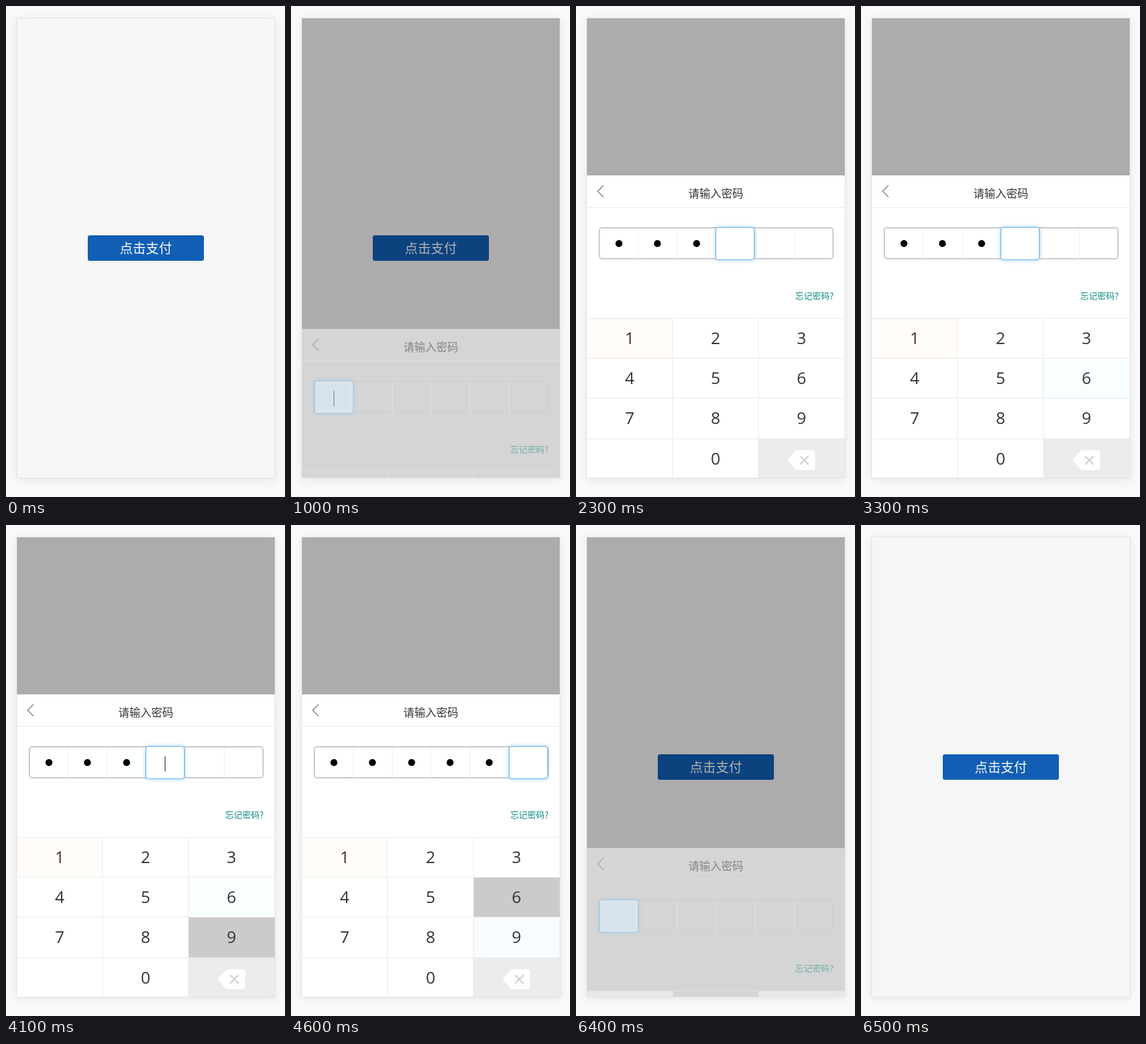
Animation, 406 px wide and 713 px high, one loop 7300 ms. Source, as an HTML page with a canvas:

```html
<!DOCTYPE html>
<html lang="zh-CN">
<head>
<meta charset="utf-8">
<title>支付密码</title>
<style>
html, body { margin: 0; width: 100%; height: 100%; overflow: hidden; background: #f9f9f9; }
canvas { display: block; }
</style>
</head>
<body>
<canvas id="stage" width="406" height="713"></canvas>
<script>
const ctx = document.getElementById('stage').getContext('2d');
const LOOP = 7300;
const OPEN = 1000, CLOSE = 6400, STEP = 100;
const SLIDE = 223, HALF_ALPHA = 0.5;
const SANS = '"Open Sans", "Noto Sans CJK SC", "Noto Sans CJK", sans-serif';
const CJK = '"Noto Sans CJK SC", "Noto Sans CJK", "Noto Sans CJK JP", sans-serif';
const COLS = [16, 141, 266, 391];
const ROWS = [454, 512, 570, 629, 685];
const PRESSED = '#cbcbcc';

// [time, number of dots entered]
const ENTRIES = [[0, 0], [1700, 1], [2000, 2], [2200, 3], [2500, 4], [3300, 3],
  [3600, 2], [4100, 3], [4300, 4], [4600, 5], [4900, 0]];

// Each press lasts one step and leaves a faint tint on the key.
const PRESSES = [
  { at: 1700, key: 1, tint: '#fffcf9' },
  { at: 2500, key: 6, tint: '#f9ffff' },
  { at: 4100, key: 9, tint: '#f8fcff' },
  { at: 4600, key: 6, tint: '#f9ffff' },
  { at: 4900, key: 3, tint: '#f8fcff' }
];

const lastBefore = (list, t) => list.filter(e => e[0] <= t).pop()[1];

function caretVisible(t) {
  const blink = 4700 / 12;
  const n = Math.floor((t - 1400) / blink + 0.12);
  return Math.abs(n % 2) === 1;
}

function rect(x, y, w, h, color) {
  ctx.fillStyle = color;
  ctx.fillRect(x, y, w, h);
}

function roundRect(x, y, w, h, r) {
  ctx.beginPath();
  ctx.roundRect(x, y, w, h, r);
}

function polyline(points, color, width) {
  ctx.beginPath();
  points.forEach(([x, y]) => ctx.lineTo(x, y));
  ctx.strokeStyle = color;
  ctx.lineWidth = width;
  ctx.stroke();
}

function text(str, x, y, size, color, family = CJK, align = 'center') {
  ctx.font = `${size}px ${family}`;
  ctx.textAlign = align;
  ctx.fillStyle = color;
  ctx.fillText(str, x, y);
}

function shadow(color, blur, y = 0) {
  ctx.shadowColor = color;
  ctx.shadowBlur = blur;
  ctx.shadowOffsetY = y;
}

function drawPage() {
  rect(0, 0, 406, 713, '#f9f9f9');
  ctx.save();
  shadow('rgba(0,0,0,0.08)', 12, 2);
  rect(15, 17, 377, 669, '#e3e3e3');
  ctx.restore();
  rect(16, 18, 375, 667, '#f6f6f6');
  roundRect(119, 333, 169, 37, 3);
  ctx.fillStyle = '#115eb4';
  ctx.fill();
  text('点击支付', 203.5, 359, 19, '#fff');
}

function drawInput(t) {
  const count = lastBefore(ENTRIES, t);
  roundRect(34, 322, 340, 45, 4);
  ctx.strokeStyle = '#cccccc';
  ctx.lineWidth = 2;
  ctx.stroke();
  for (let i = 1; i < 6; i++) rect(Math.round(33.6 + 56.6 * i), 323, 1, 46, '#efefef');

  const x = Math.round(34.5 + 56.6 * count) - 0.5;
  ctx.save();
  shadow('rgba(82,168,236,0.6)', 6);
  roundRect(x, 321.5, 56, 47, 4);
  ctx.fillStyle = '#fff';
  ctx.fill();
  ctx.restore();
  ctx.strokeStyle = '#70b6ec';
  ctx.lineWidth = 1.2;
  ctx.stroke();

  const center = i => Math.floor(62.1 + 56.5 * i);
  for (let i = 0; i < count; i++) {
    roundRect(center(i) - 4.5, 340, 10, 10, 4.7);
    ctx.fillStyle = '#000';
    ctx.fill();
  }
  if (caretVisible(t)) rect(center(count), 336, 1, 22, '#222');
}

function drawBackspace() {
  rect(265, 628, 126, 57, '#ececec');
  ctx.beginPath();
  ctx.moveTo(308, 659.5);
  ctx.lineTo(319, 646.5);
  ctx.quadraticCurveTo(320.5, 645, 323, 645);
  ctx.arcTo(348, 645, 348, 649, 4);
  ctx.arcTo(348, 674, 344, 674, 4);
  ctx.lineTo(323, 674);
  ctx.quadraticCurveTo(320.5, 674, 319, 672.5);
  ctx.closePath();
  ctx.fillStyle = '#fff';
  ctx.fill();
  polyline([[326, 653.5], [338.5, 666]], '#d0d0d0', 2);
  polyline([[338.5, 653.5], [326, 666]], '#d0d0d0', 2);
}

function drawKeys(t) {
  for (const { at, key, tint } of PRESSES) {
    if (t < at) continue;
    const c = (key - 1) % 3, r = Math.floor((key - 1) / 3);
    rect(COLS[c], ROWS[r], COLS[c + 1] - COLS[c], ROWS[r + 1] - ROWS[r],
      t < at + STEP ? PRESSED : tint);
  }
  for (const y of ROWS.slice(0, 4)) rect(16, y - 1, 375, 1, '#ebebeb');
  for (const x of COLS.slice(1, 3)) rect(x - 1, 453, 1, 232, '#ebebeb');
  drawBackspace();
  const baselines = [491, 549, 607, 666];
  const centers = [78, 203, 328];
  for (let n = 1; n <= 9; n++) {
    text(n, centers[(n - 1) % 3], baselines[Math.floor((n - 1) / 3)], 24, '#333', SANS);
  }
  text(0, centers[1], baselines[3], 24, '#333', SANS);
}

function drawPanel(t) {
  rect(16, 246, 375, 439, '#fff');
  rect(16, 292, 375, 1, '#ebebeb');
  polyline([[40, 260.5], [31.5, 269], [40, 277.5]], '#888', 1.4);
  text('请输入密码', 203.5, 278, 16, '#333');
  drawInput(t);
  text('忘记密码?', 375, 426, 12.5, '#0b8a7d', CJK, 'right');
  drawKeys(t);
}

function draw(t) {
  drawPage();
  if (t < OPEN || t >= CLOSE + STEP) return;
  const halfway = t < OPEN + STEP || t >= CLOSE;
  ctx.save();
  ctx.beginPath();
  ctx.rect(16, 18, 375, 667);
  ctx.clip();
  rect(16, 18, 375, 667, 'rgba(0,0,0,0.3)');
  if (halfway) {
    ctx.globalAlpha = HALF_ALPHA;
    ctx.translate(0, SLIDE);
  }
  drawPanel(t);
  ctx.restore();
}

const start = performance.now();
function tick() {
  draw((performance.now() - start) % LOOP);
  requestAnimationFrame(tick);
}
tick();
</script>
</body>
</html>
```
